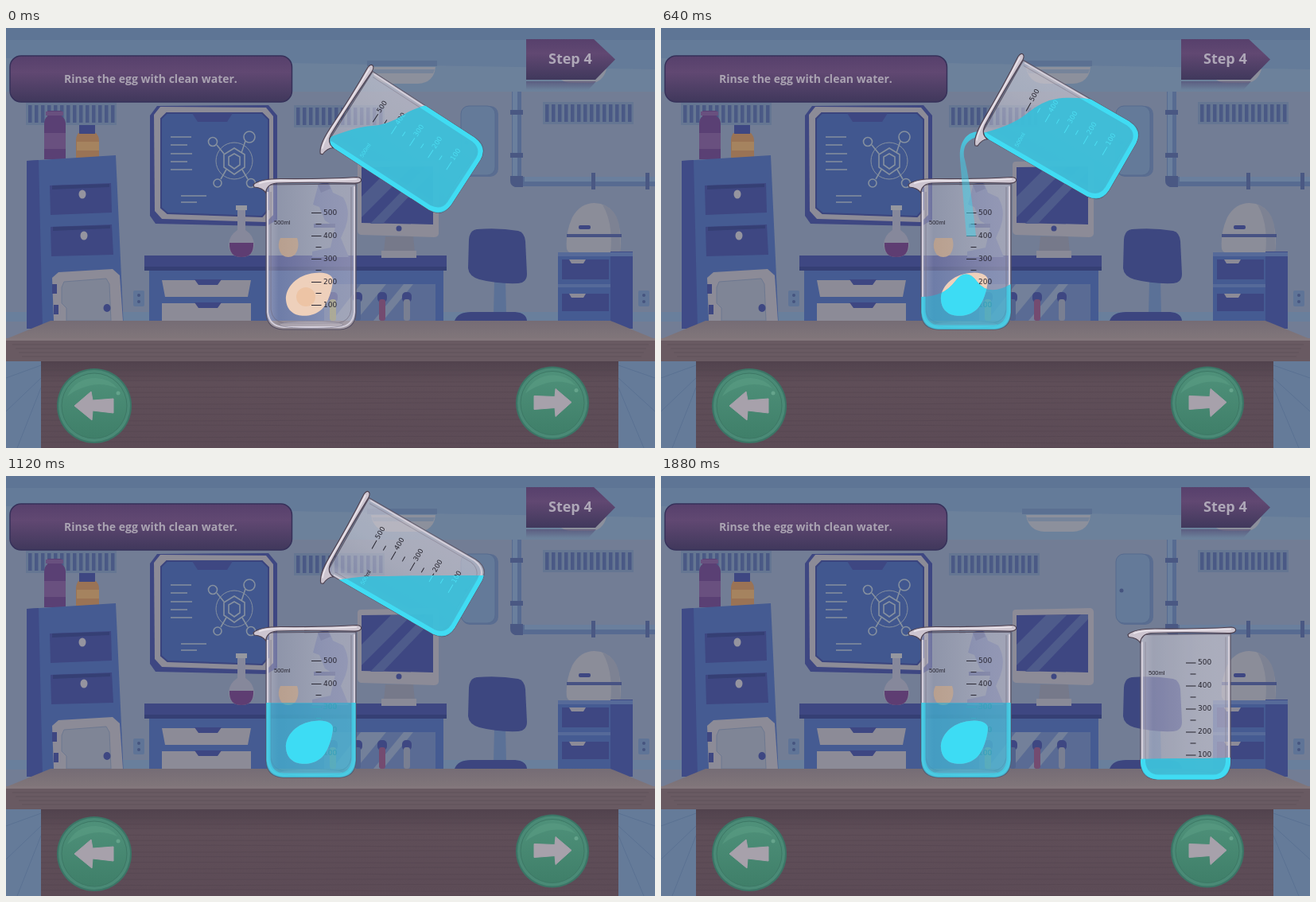
Animation, 816 px wide and 528 px high, one loop 2 s. Source, as an HTML page:

```html
<!DOCTYPE html>
<html lang="en">
<head>
<meta charset="utf-8">
<title>Rinse the egg</title>
<style>
  html, body { margin: 0; width: 100%; height: 100%; overflow: hidden; background: #727d95; }
  svg { display: block; width: 816px; height: 528px; }
  .ui { font: bold 14px "Open Sans", sans-serif; fill: #aaa3b2; }
  .step { font-size: 18px; fill: #afa8b8; }
  .num { font: 9px "DejaVu Sans", sans-serif; }
  .vol { font: 7.5px "Liberation Sans", Arial, sans-serif; }
  .navy { fill: #3e4782; }
  .blue { fill: #455b92; }
  .pale { fill: #8c8b97; }
  .line { fill: none; stroke: #85909f; stroke-width: 1.6; }
</style>
</head>
<body>
<svg viewBox="0 0 816 528">
  <defs>
    <linearGradient id="pill" x2="0" y2="1">
      <stop stop-color="#57406c"/><stop offset=".35" stop-color="#614872"/><stop offset="1" stop-color="#40385c"/>
    </linearGradient>
    <linearGradient id="fade" x2="0" y2="1">
      <stop stop-color="#50456f" stop-opacity=".6"/><stop offset="1" stop-color="#50456f" stop-opacity="0"/>
    </linearGradient>
    <linearGradient id="wood" x2="0" y2="1">
      <stop stop-color="#756c75"/><stop offset="1" stop-color="#81767a"/>
    </linearGradient>
    <linearGradient id="front" x2="0" y2="1">
      <stop stop-color="#51424d"/><stop offset=".25" stop-color="#5f4e58"/><stop offset="1" stop-color="#5c4b56"/>
    </linearGradient>
    <linearGradient id="green" x2="0" y2="1">
      <stop stop-color="#4f917a"/><stop offset="1" stop-color="#3f7f69"/>
    </linearGradient>
    <linearGradient id="glass">
      <stop stop-color="#dcd6e0" stop-opacity=".5"/><stop offset=".14" stop-color="#d9d4e0" stop-opacity=".28"/>
      <stop offset=".6" stop-color="#e0dbe4" stop-opacity=".38"/><stop offset="1" stop-color="#d0cbd8" stop-opacity=".5"/>
    </linearGradient>
    <linearGradient id="jetFill" x2="0" y2="1">
      <stop stop-color="#3fdaf2" stop-opacity=".85"/><stop offset=".3" stop-color="#3fd3ec" stop-opacity=".5"/>
      <stop offset="1" stop-color="#4fd0e6" stop-opacity=".55"/>
    </linearGradient>

    <path id="body" d="M327 197V358Q328 378 348 379H420Q439 378 440 358V196Z"/>
    <path id="wall" d="M330 200V357Q332 375 349 376H419Q435 375 437 357V200" fill="none"/>
    <path id="egg" d="M352 342C351 326 366 310 388 308C400 306 412 310 411 318C410 330 404 350 394 356C382 365 354 366 352 342Z"/>
    <g id="marks"></g>
    <g id="shell">
      <use href="#body" fill="url(#glass)" stroke="#575062" stroke-width="1.2"/>
      <path d="M329 206V357Q331 375 349 376H419Q436 375 438 357V199" fill="none" stroke="#d3cedb" stroke-width="2"/>
      <path d="M333 206V354Q335 369 350 371H417Q432 369 434 354V200" fill="none" stroke="#6f687c" stroke-opacity=".6"/>
      <ellipse cx="384" cy="373" rx="40" ry="4.500" fill="#d8d4e2" fill-opacity=".3" stroke="#8b8799" stroke-width=".8"/>
    </g>
    <g id="rim">
      <path d="M311 197Q319 189.500 345 189.500Q400 190 441 187.500Q447.500 188 446.500 192Q445 195.500 437 195Q380 193.500 340 195Q328 196 326.500 207Q323 201 312 200Z" fill="#cdc5d0" stroke="#4c404f" stroke-width="1.2"/>
      <path d="M318 195.500Q328 191.500 350 191.500Q400 192 441 190" fill="none" stroke="#ebe5ec" stroke-width="1.6"/>
    </g>
    <clipPath id="clipA"><path id="surfA"/></clipPath>
    <clipPath id="clipB"><path id="surfB"/></clipPath>
    <clipPath id="clipJet"><rect id="jetBox" x="360" width="60"/></clipPath>
  </defs>

  <!-- room -->
  <rect width="816" height="528" fill="#727d95"/>
  <rect width="816" height="80" fill="#6c819b"/>
  <path d="M0 0H816V52L0 38Z" fill="#647b99"/>
  <rect width="816" height="15" fill="#5e7595"/>
  <rect y="357" width="816" height="12" fill="#697f9c"/>
  <path d="M0 400H60V528H0ZM760 400H816V528H760Z" fill="#657b99"/>
  <path d="M0 440L44 424M0 482L44 440M14 528L44 452M816 440L770 424M816 482L770 440M802 528L770 452" stroke="#5a7192"/>
  <g id="vents"></g>
  <path d="M454 41H542V48H454Z" fill="#5b7092"/>
  <path d="M459 49H540Q538 69 518 70H482Q462 69 459 49Z" fill="#8c909c"/>
  <path d="M460 52H539L537 57H462Z" fill="#76849a"/>
  <path d="M690 52H755Q750 69 735 69H712Q694 69 690 52Z" fill="#8c909c"/>

  <!-- pipes and hatch -->
  <path d="M642 80V186Q642 193 650 193H816" fill="none" stroke="#576b91" stroke-width="12"/>
  <path d="M640 80V186M652 190H816" fill="none" stroke="#6a7f9d" stroke-width="6"/>
  <path d="M634 103H650V109H634ZM634 157H650V163H634ZM736 182H741V203H736ZM804 182H809V203H804ZM634 186H650V200H640Q634 198 634 192Z" fill="#4a5883"/>
  <rect x="573" y="98" width="46" height="89" rx="10" fill="#5a6d91"/>
  <rect x="572" y="98" width="43" height="87" rx="10" fill="#647a99" stroke="#566b8f"/>
  <circle cx="579" cy="144" r="2.500" fill="#46547f"/>

  <!-- wall board -->
  <path class="navy" d="M181 110L190 98L330 97L341 110V241L328 249L188 246L181 236Z"/>
  <path class="pale" d="M186 109L194 99L327 100L336 111V235L327 244L196 240L187 230Z"/>
  <path d="M195 114L202 107H322L330 115V228L322 237L203 233L195 226Z" fill="#41578f" stroke="#3a447e" stroke-width="2"/>
  <path class="navy" d="M234 107H285L278 118H241Z"/>
  <path class="line" d="M207 137H233M207 147H228M207 158H234M207 168H228M207 178H234M220 211H252M220 219H240"/>
  <g class="line">
    <path d="M287 151L300 159V175L287 184L274 175V159ZM287 158L294 162V172L287 177L280 172V162Z"/>
    <circle cx="287" cy="167" r="23" stroke-width="1"/>
    <path d="M265 147L274 158M301 142L296 157M270 190L277 178M304 190L297 178"/>
    <circle cx="260" cy="143" r="5.500"/><circle cx="306" cy="137" r="7"/>
    <circle cx="266" cy="195" r="5"/><circle cx="308" cy="195" r="5.500"/>
  </g>

  <!-- left cabinet -->
  <path d="M52 104H70V111Q75 114 75 121V165H48V121Q48 114 52 111Z" fill="#5a4074"/>
  <path d="M50 105H72V110H50ZM48 132H75V152H48Z" fill="#69507f"/>
  <path d="M91 132H113Q117 136 117 142V164H88V142Q88 136 91 132Z" fill="#9a7355"/>
  <path d="M92 122H112V133H92Z" class="navy"/>
  <path d="M89 143H117V154H89Z" fill="#a5835f"/>
  <path class="blue" d="M26 167L138 160L148 378H26Z"/>
  <path d="M26 167L41 166L46 378H26Z" fill="#3f4b87"/>
  <path class="navy" d="M55 198L132 195L133 232L56 235ZM56 250L133 247L135 285L57 287Z"/>
  <path d="M58 198L130 196V200L58 203ZM59 250L131 248V252L59 255Z" fill="#353f74"/>
  <ellipse cx="96" cy="209" rx="4.500" ry="5.500" fill="#95949f"/>
  <ellipse cx="98" cy="261" rx="4.500" ry="5.500" fill="#95949f"/>
  <path class="pale" d="M58 314L66 307L134 303L143 311L147 368H60Z"/>
  <path d="M73 319L126 315L130 322L132 368H76V352L70 346V326Z" fill="#7f8596" stroke="#6d7890"/>
  <path d="M58 322H64V334H58ZM60 348H66V360H60Z" class="navy"/>
  <ellipse cx="127" cy="352" rx="4.500" ry="5" class="navy"/>
  <g id="outlets"></g>

  <!-- rear desk -->
  <path class="blue" d="M180 304H550V370H180Z"/>
  <path class="navy" d="M174 286H554V304H174Z"/>
  <path d="M174 300H554V305H174Z" fill="#353f74"/>
  <path class="pale" d="M196 317H308L304 338H200ZM196 346H308V368H196Z"/>
  <path class="navy" d="M237 316H271L266 323H242ZM237 345H271L266 352H242Z"/>
  <path d="M400 322H540V368H400Z" fill="#5a6b94"/>
  <path d="M446 322H478L440 368H410ZM500 322H512L474 368H462Z" fill="#73809a"/>
  <g id="tubes"></g>
  <path d="M291 228H301V254Q312 261 312 273Q311 288 296 288Q281 288 280 273Q280 261 291 254Z" fill="#86889b"/>
  <path d="M281 270H311Q312 288 296 288Q280 288 281 270Z" fill="#5e3d72"/>
  <path d="M289 223H303V229H289Z" fill="#95979f"/>
  <path d="M345 264H366Q369 272 366 280Q363 288 355 288Q347 288 344 280Q341 272 345 264Z" fill="#ab8b6f"/>
  <path d="M393 196L405 192L411 207L424 213Q434 230 427 250L421 264L431 288H385V281L408 276L414 250L401 242L394 225L386 222L390 207Z" fill="#596692"/>
  <path d="M392 197L404 193L408 202L396 207ZM387 246H414V251H387Z" fill="#475282"/>

  <!-- monitor, chair, right cabinet -->
  <path d="M477 262H512L514 282H475Z" fill="#76798a"/>
  <path d="M472 280H516V289H472Z" fill="#898a97"/>
  <path class="pale" d="M446 168L540 166Q544 167 544 171V259Q543 263 538 263L446 260Q442 259 442 255V172Q442 168 446 168Z"/>
  <path class="navy" d="M447 175L537 174V247L447 245Z"/>
  <path d="M484 175H510L447 238V212ZM528 174H537V180L474 246H458Z" fill="#4e5b8b"/>
  <circle cx="494" cy="252" r="3.500" class="navy"/>
  <path d="M614 318H628L629 360H613Z" fill="#5b7197"/>
  <path d="M592 253Q620 251 644 255Q652 257 653 268L655 309Q655 320 644 321Q618 322 595 316Q582 312 581 302L582 266Q583 254 592 253Z" fill="#3d4780"/>
  <path d="M564 368Q568 357 585 357H640Q654 358 655 368Z" fill="#3c457f"/>
  <path d="M705 278Q703 258 712 238Q722 220 740 220Q761 221 768 240Q774 255 773 278Q770 284 757 284H718Q707 284 705 278Z" fill="#8b8d99"/>
  <path d="M750 222Q767 228 771 248L773 280L760 284Q764 246 750 222Z" fill="#7d8293"/>
  <path d="M705 259H774V263H705Z" fill="#475283"/>
  <rect x="720" y="248" width="15" height="5" rx="2" class="navy"/>
  <path class="blue" d="M694 283H762V370H694Z"/>
  <path d="M760 281H788V378H760Z" fill="#3f4b87"/>
  <path class="navy" d="M699 291H758V316H699ZM699 334H758V356H699Z"/>
  <path d="M694 282H788V287H694ZM694 322H760V326H694Z" fill="#566a99"/>
  <path class="pale" d="M708 291H729L726 296H711ZM708 334H729L726 339H711Z"/>

  <!-- table -->
  <path d="M56 368H760L816 391H0Z" fill="url(#wood)"/>
  <rect y="390" width="816" height="29" fill="#695a62"/>
  <rect y="390" width="816" height="3" fill="#83777c"/>
  <rect x="44" y="419" width="726" height="109" fill="url(#front)"/>
  <g id="grain" fill="none" stroke="#4d3f4b" stroke-opacity=".35"></g>

  <!-- controls -->
  <rect x="5" y="35" width="354.500" height="58" rx="14" fill="url(#pill)" stroke="#36315a" stroke-width="1.500"/>
  <text class="ui" x="73" y="69">Rinse the egg with clean water.</text>
  <path d="M654 67H742L732 78H654Z" fill="url(#fade)"/>
  <path d="M654 14H739L766 39.500L741 65H654Z" fill="url(#pill)"/>
  <text class="ui step" x="682" y="45">Step 4</text>
  <g id="buttons"></g>

  <!-- standing beaker -->
  <use href="#shell"/>
  <use href="#egg" fill="#eed0bb"/>
  <circle cx="377" cy="338" r="12" fill="#edc4a5"/>
  <use href="#marks" fill="#292733"/>
  <g clip-path="url(#clipA)">
    <use href="#body" fill="#2fadd0" fill-opacity=".66"/>
    <use href="#wall" stroke="#40d4ec" stroke-width="5" stroke-opacity=".7"/>
    <use href="#marks" fill="#45c4dc" opacity=".6"/>
    <use href="#egg" fill="#3ddcf4"/>
  </g>
  <use href="#rim"/>

  <!-- pouring beaker -->
  <g id="shellB"><use href="#shell"/><use href="#body" fill="#d8d0d6" fill-opacity=".2"/><use href="#marks" fill="#24222c"/></g>
  <g clip-path="url(#clipB)">
    <g id="waterB">
      <use href="#body" fill="#38bfda" fill-opacity=".93"/>
      <use href="#wall" stroke="#40dcf3" stroke-width="6"/>
      <use href="#marks" fill="#50e2f6"/>
    </g>
  </g>
  <g id="jet"><path clip-path="url(#clipJet)" fill="url(#jetFill)" d="M405 131C388 127 374 140 376 165L384 262H396C392 220 386 180 381 162C379 145 389 137 405 136Z"/></g>
  <g id="rimB"><use href="#rim"/></g>
  <path id="lip" d="M405 137Q430 134 447 149Q440 157 428 155Z" fill="#40def5"/>
</svg>
<script>
  const $ = id => document.getElementById(id);
  const rect = (x, y, w, h, fill, rx = 0) =>
    `<rect x="${x}" y="${y}" width="${w}" height="${h}" rx="${rx}"${fill ? ` fill="${fill}"` : ''}/>`;
  const times = (n, f) => Array.from({ length: n }, (_, i) => f(i)).join('');

  $('vents').innerHTML = [[25, 94], [362, 97], [675, 93]].map(([x, y]) =>
    rect(x, y, 114, 28, '#657692') + times(14, i => rect(x + 3 + i * 8, y + 3, 4.5, 22, '#4a5985'))).join('');

  $('outlets').innerHTML = [160, 795].map(x =>
    rect(x, 330, 14, 20, '#5f7497', 2) + rect(x + 5, 334, 4, 4, '#46547f', 2) + rect(x + 5, 342, 4, 4, '#46547f', 2)).join('');

  $('tubes').innerHTML = ['#8a8a62', '#52638c', '#744b70', '#797f92'].map((fill, i) => {
    const x = 405 + i * 31;
    return rect(x, 332, 12, 13, '#3e4782', 5) + rect(x + 2, 341, 8, 27, fill, 3);
  }).join('');

  $('grain').innerHTML = times(15, i => {
    const y = 430 + i * 7, d = 2 * Math.sin(i * 2.3);
    return `<path d="M44 ${y}Q230 ${y + d} 400 ${y}T770 ${y}"/>`;
  }) + times(4, i => `<path d="M${8 + i * 4} ${398 + i * 5}H${808 - i * 3}"/>`);

  $('marks').innerHTML = [500, 400, 300, 200, 100].map((n, i) => {
    const y = 232 + i * 29;
    return rect(384, y, 12.5, 1) + (i < 4 ? rect(389.5, y + 14, 7, 1) : '') +
      `<text class="num" x="399" y="${y + 2.5}">${n}</text>`;
  }).join('') + '<text class="vol" x="337" y="247">500ml</text>';

  const button = (x, y, r, arrow) => `<g transform="translate(${x} ${y})">
    <circle r="${r}" fill="#3b7566"/><circle r="${r - 2}" fill="#4a8a76"/>
    <circle r="${r - 6}" fill="url(#green)" stroke="#3d7865"/>
    <path d="M-34 -12Q-24 -35 2 -35Q20 -34 29 -22Q10 -30 -8 -25Q-25 -20 -34 -12Z" fill="#5a9d84" opacity=".6"/>
    <circle cx="30" cy="-16" r="2.500" fill="#65a48c"/>
    <path d="${arrow}" fill="#a7a1ab" stroke="#a7a1ab" stroke-linejoin="round"/></g>`;
  $('buttons').innerHTML =
    button(111, 475, 47, 'M-25 0L-4 -18L-2 -7L24 -9L24 9L-2 6L-3 18Z') +
    button(687, 471.5, 46, 'M24 -1L4 -18L3 -8L-23 -9L-23 8L3 6L4 17Z');

  // Rows are [time, ...values].
  const pose = [ // rim corner x, y, angle, scale
    [0, 460, 46, -57, .95], [280, 453, 41, -60.5, .955], [640, 454, 32, -60, .955],
    [960, 455, 24, -60, .955], [1120, 455, 19, -60, .955], [1280, 638, 82, -11, .955],
    [1400, 723, 191, 0, 1], [1440, 723, 191, 0, 1], [1880, 723, 192.5, 0, 1]
  ];
  const surface = [ // left x, spacing, five heights
    [0, 400, 40, 140, 124, 122, 96, 91], [280, 400, 40, 137, 129, 98, 94, 92],
    [640, 400, 40, 133, 124, 91, 86, 92], [960, 400, 40, 131, 107, 107, 105, 104],
    [1120, 400, 40, 134, 126, 126, 125, 125], [1280, 552, 28, 253, 247, 243, 243, 236],
    [1400, 600, 29, 352, 355, 344, 354, 353], [1440, 600, 29, 352, 355, 344, 354, 353],
    [1880, 600, 29, 356, 355, 355, 355, 354]
  ];
  const level = [[420, 390], [440, 377], [640, 330], [840, 285]];
  const head = [[200, 120], [280, 152], [400, 265]];
  const tail = [[760, 120], [880, 265]];
  const shine = [[0, 0], [160, 0], [280, 1], [440, 0]];
  const wave = [8, 8, -30, 8, -8];

  function at(keys, t) {
    const i = keys.findIndex(k => k[0] > t);
    if (i === 0) return keys[0].slice(1);
    if (i < 0) return keys[keys.length - 1].slice(1);
    const a = keys[i - 1], b = keys[i], u = (t - a[0]) / (b[0] - a[0]);
    return a.slice(1).map((v, j) => v + (b[j + 1] - v) * u);
  }

  // Everything below a smooth line through evenly spaced heights.
  function below(x, gap, ys) {
    let d = `M${x - 60} ${ys[0]}L${x} ${ys[0]}`;
    for (let i = 1; i < ys.length - 1; i++) {
      const last = i === ys.length - 2;
      const y = last ? ys[i + 1] : (ys[i] + ys[i + 1]) / 2;
      d += `Q${x + i * gap} ${ys[i]} ${x + (last ? i + 1 : i + .5) * gap} ${y}`;
    }
    return d + `H${x + 6 * gap}V528H${x - 60}Z`;
  }

  function draw(t) {
    const [x, y, turn, size] = at(pose, t);
    const move = `translate(${x} ${y}) rotate(${turn}) scale(${size}) translate(-447 -190)`;
    for (const id of ['shellB', 'waterB', 'rimB']) $(id).setAttribute('transform', move);

    const [left, gap, ...ys] = at(surface, t);
    $('surfB').setAttribute('d', below(left, gap, ys));

    const [base] = at(level, t);
    const swell = t > 420 && t < 840 ? Math.sin(Math.PI * (t - 420) / 420) : 0;
    $('surfA').setAttribute('d', below(327, 28.25, wave.map(w => base + w * swell)));

    const [top] = at(tail, t), [end] = at(head, t);
    $('jetBox').setAttribute('y', top);
    $('jetBox').setAttribute('height', Math.max(0, end - top));
    $('jet').setAttribute('transform', `translate(0 ${y - 32})`);
    $('lip').setAttribute('opacity', at(shine, t)[0]);
  }

  const start = performance.now();
  function tick() {
    const t = (performance.now() - start) % 2000;
    draw(Math.min(1880, Math.floor(t / 40) * 40));
    requestAnimationFrame(tick);
  }
  tick();
</script>
</body>
</html>
```
